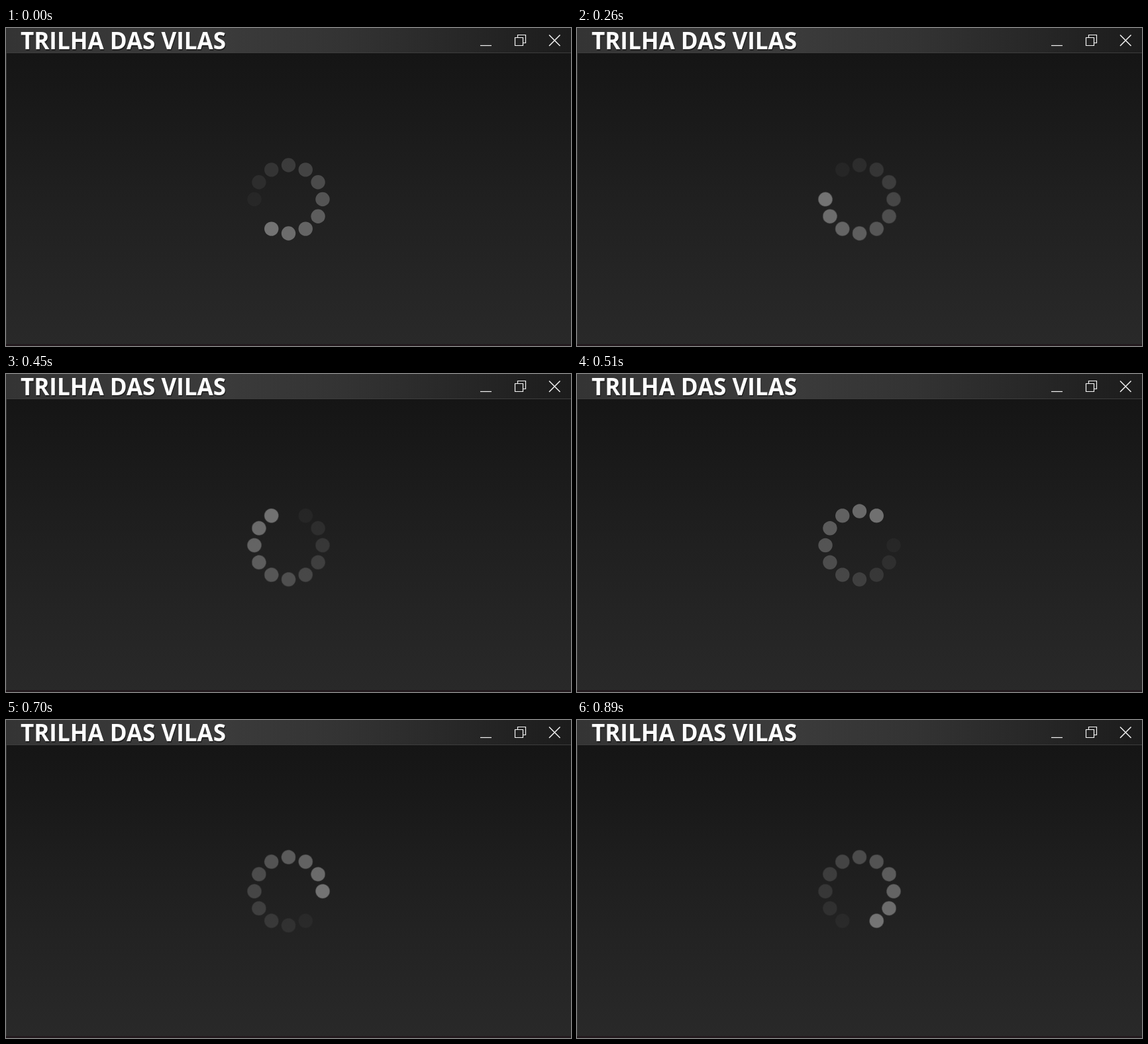
These frames come from a looping animation (853 px wide and 480 px high, 1020 ms). An HTML page:

```html
<!DOCTYPE html>
<html lang="pt">
<head>
<meta charset="utf-8">
<title>Trilha das Vilas</title>
<style>
  html, body { margin: 0; width: 100%; height: 100%; overflow: hidden; background: #1c1c1c; }
  svg { display: block; width: 100vw; height: 100vh; }
  .title {
    font: 700 35px "Open Sans", Roboto, sans-serif;
    font-stretch: 75%;
    fill: #fff;
  }
  .shade { fill: #111; opacity: .6; }
  .icons { fill: none; stroke: #f4f4f4; stroke-width: 1.2; }
  #ring {
    transform-origin: 426.5px 258.5px;
    animation: turn 1020ms step-end infinite;
  }
  @keyframes turn {
    0% { transform: rotate(0deg); }
    12.745% { transform: rotate(30deg); }
    25.49% { transform: rotate(60deg); }
    31.372% { transform: rotate(90deg); }
    44.117% { transform: rotate(120deg); }
    50% { transform: rotate(180deg); }
    62.745% { transform: rotate(210deg); }
    68.627% { transform: rotate(240deg); }
    81.372% { transform: rotate(270deg); }
    87.254% { transform: rotate(300deg); }
    100% { transform: rotate(360deg); }
  }
</style>
</head>
<body>
<svg viewBox="0 0 853 480" preserveAspectRatio="none">
  <defs>
    <linearGradient id="bar">
      <stop offset="0" stop-color="#343434"/>
      <stop offset=".38" stop-color="#3b3b3b"/>
      <stop offset=".6" stop-color="#333"/>
      <stop offset="1" stop-color="#1c1c1c"/>
    </linearGradient>
    <linearGradient id="panel" x2="0" y2="1">
      <stop offset="0" stop-color="#151515"/>
      <stop offset=".5" stop-color="#202020"/>
      <stop offset="1" stop-color="#292929"/>
    </linearGradient>
  </defs>

  <rect width="853" height="38" fill="url(#bar)"/>
  <rect y="38" width="853" height="442" fill="url(#panel)"/>
  <rect y="37" width="853" height="1" fill="#3d3d3d"/>
  <rect y="38" width="1" height="442" fill="#353535"/>
  <rect y="477" width="853" height="3" fill="#231a1e"/>

  <text class="title shade" x="23" y="33.5" aria-hidden="true">TRILHA DAS VILAS</text>
  <text class="title" x="22" y="32">TRILHA DAS VILAS</text>

  <g class="icons">
    <path d="M716 26.5H733"/>
    <path d="M768.5 14.5H780.5V26.5H768.5ZM772.5 14.5V10.5H784.5V22.5H780.5"/>
    <path d="M820 10.5L836.5 27M836.5 10.5L820 27" stroke-width="1.5"/>
  </g>

  <g id="ring"></g>
</svg>
<script>
  const ring = document.getElementById('ring');
  const count = 12;

  // The head sits at seven o'clock; the tail fades out behind it.
  for (let i = 0; i < count - 1; i++) {
    const angle = (120 - i * 30) * Math.PI / 180;
    const dot = document.createElementNS('http://www.w3.org/2000/svg', 'circle');
    dot.setAttribute('cx', 426.5 + 51.5 * Math.cos(angle));
    dot.setAttribute('cy', 258.5 + 51.5 * Math.sin(angle));
    dot.setAttribute('r', 10.7);
    dot.setAttribute('fill', '#fff');
    dot.setAttribute('fill-opacity', 0.37 * (1 - i / (count - 1)));
    ring.append(dot);
  }

  // Track the title evenly across its part of the bar.
  for (const text of document.querySelectorAll('.title')) {
    const gaps = text.textContent.length - 1;
    text.style.letterSpacing = (310 - text.getComputedTextLength()) / gaps + 'px';
  }
</script>
</body>
</html>
```
